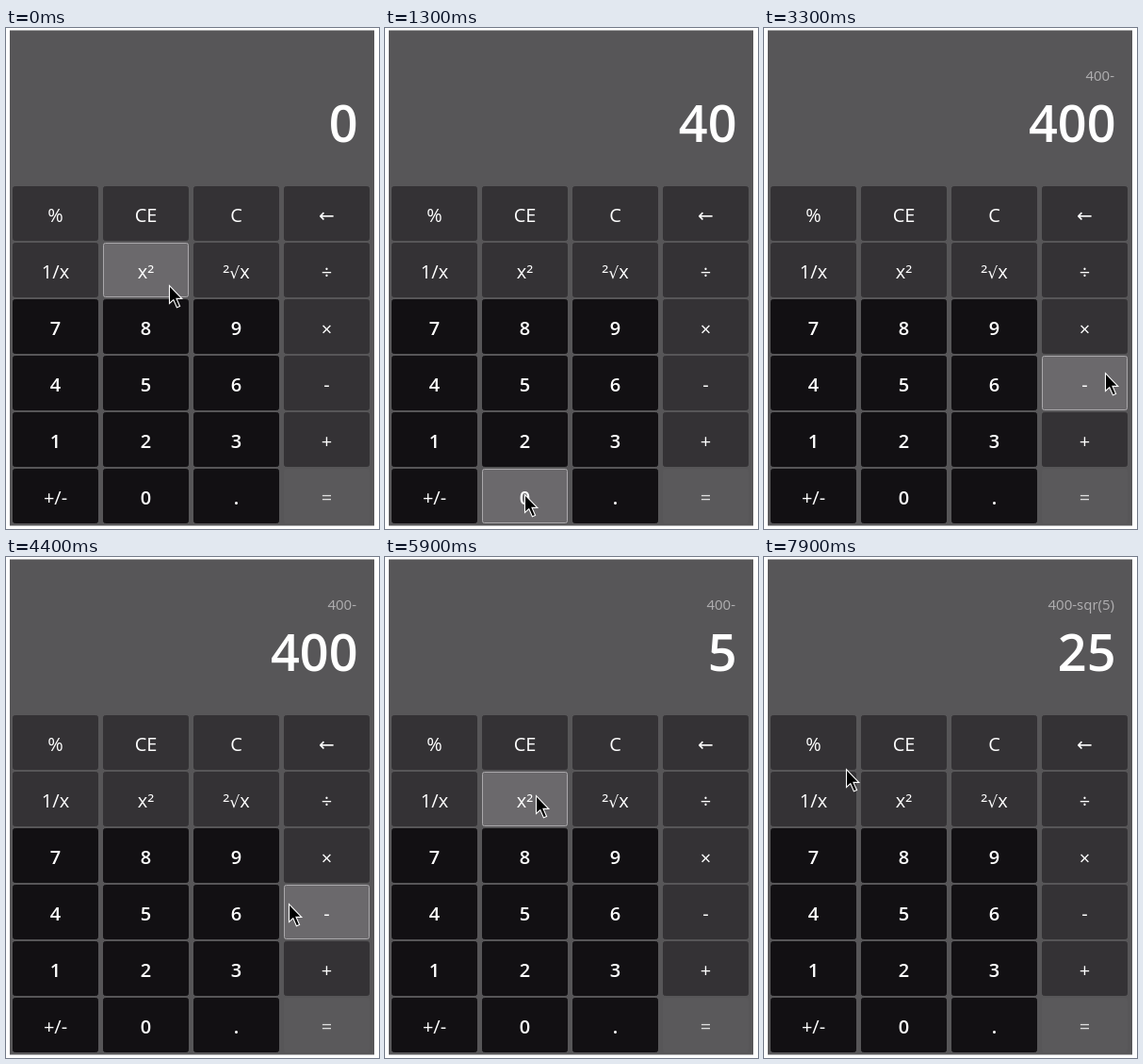
An HTML page that plays this animation: 396 px wide and 532 px high, repeating every 8000 ms.

```html
<!DOCTYPE html>
<html lang="en">
<head>
<meta charset="utf-8">
<title>Calculator</title>
<style>
  html, body { margin: 0; width: 100%; height: 100%; overflow: hidden; background: #fff; }
  svg { display: block; }
  text { font: 20px "Open Sans", "Noto Sans", sans-serif; fill: #fff; text-anchor: middle; }
  .digit { font-weight: 600; }
  .equals { fill: #ddd; }
  .arrow, .root { font-family: "DejaVu Sans", sans-serif; }
  .root { font-size: 17px; }
  #value { font-size: 54px; font-weight: 600; text-anchor: end; }
  #note { font-size: 15px; fill: #b1b0b2; text-anchor: end; }
</style>
</head>
<body>
<svg width="396" height="532" viewBox="0 0 396 532">
  <rect x="4" y="2.5" width="387" height="526" fill="#575658"/>
  <text id="note" x="372" y="55.5"></text>
  <text id="value" x="373.5" y="121"></text>
  <g id="keys"></g>
  <path id="cursor" d="M.5 .5V19.5L4.8 15.6 8.4 23.8 11.6 22.4 8 14.4H13.8Z"
        fill="#000" stroke="#fff" stroke-width="1.1"/>
</svg>
<script>
const LOOP = 8000, STEP = 100;
const LEFT = 7, TOP = 168, COL = 96, ROW = 60, KEY_W = 91, KEY_H = 58;
const LABELS = ['%', 'CE', 'C', '←', '1/x', 'x²', '²√x', '÷', '7', '8', '9', '×',
                '4', '5', '6', '-', '1', '2', '3', '+', '+/-', '0', '.', '='];

// Pointer stops: time, x, y
const PATH = [
  [0, 173, 273], [100, 152, 290], [300, 92, 343], [500, 57, 373], [700, 57, 373],
  [900, 128, 484], [1000, 146, 495], [1800, 152, 494], [2000, 262, 455],
  [2100, 308, 430], [2300, 352, 378], [2400, 362, 366], [4200, 362, 366],
  [4300, 338, 367], [4700, 184, 370], [5400, 184, 370], [5800, 160, 253],
  [7500, 160, 253], [7800, 119, 240], [7900, 87, 225]
];
// Display changes: time, value, expression
const SCREEN = [
  [0, '0', ''], [600, '4', ''], [1200, '40', ''], [1500, '400', ''],
  [2600, '400', '400-'], [5300, '5', '400-'], [6300, '25', '400-sqr(5)']
];

const byId = id => document.getElementById(id);
const keysGroup = byId('keys'), cursor = byId('cursor');

function add(tag, attrs) {
  const el = document.createElementNS('http://www.w3.org/2000/svg', tag);
  for (const name in attrs) el.setAttribute(name, attrs[name]);
  return keysGroup.appendChild(el);
}

const keys = LABELS.map((label, i) => {
  const x = LEFT + i % 4 * COL, y = TOP + Math.floor(i / 4) * ROW;
  const digit = /^(\d|\.)$/.test(label), equals = label === '=';
  const fill = equals ? '#5a595b' : digit || label === '+/-' ? '#121013' : '#343235';
  const rect = add('rect', { x: x + .5, y: y + .5, width: KEY_W - 1, height: KEY_H - 1, rx: 2 });
  const text = add('text', {
    x: x + 45.5, y: y + (label === '×' ? 38.5 : 37.5),
    class: digit ? 'digit' : equals ? 'equals' : label === '←' ? 'arrow' : ''
  });
  if (label.includes('√')) text.innerHTML = '²<tspan class="root">√</tspan>x';
  else text.textContent = label;
  return { x, y, fill, rect };
});

function pointerAt(t) {
  const next = PATH.findIndex(p => p[0] > t);
  if (next < 0) return PATH[PATH.length - 1].slice(1);
  const [t0, x0, y0] = PATH[next - 1], [t1, x1, y1] = PATH[next];
  const k = (t - t0) / (t1 - t0);
  return [x0 + (x1 - x0) * k, y0 + (y1 - y0) * k];
}

function draw(t) {
  const [px, py] = pointerAt(t).map(Math.round);
  const [, value, note] = SCREEN.filter(s => s[0] <= t).pop();
  byId('value').textContent = value;
  byId('note').textContent = note;
  cursor.setAttribute('transform', `translate(${px} ${py})`);
  for (const { x, y, fill, rect } of keys) {
    const over = px >= x && px < x + KEY_W && py >= y && py < y + KEY_H - 1;
    rect.setAttribute('fill', over ? '#6b696c' : fill);
    rect.setAttribute('stroke', over ? '#aaa8ab' : fill);
  }
}

let start, last;
function tick(now) {
  start ??= now;
  const t = Math.floor((now - start) % LOOP / STEP) * STEP;
  if (t !== last) draw(last = t);
  requestAnimationFrame(tick);
}
draw(0);
requestAnimationFrame(tick);
</script>
</body>
</html>
```
